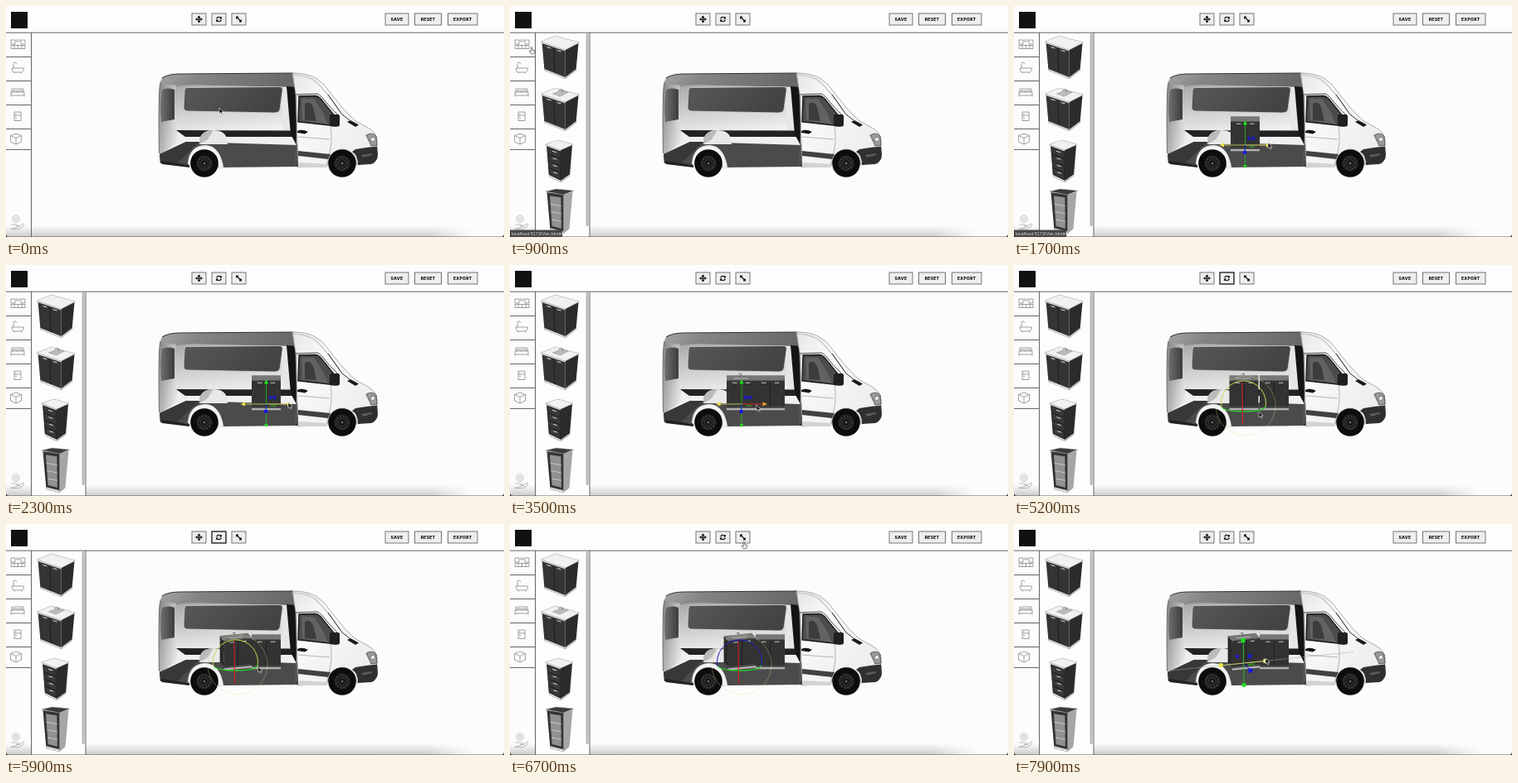
Write an HTML page that moves like this. It is 600 px wide and 279 px high and loops after 8000 ms.

```html
<!DOCTYPE html>
<html lang="en">
<head>
<meta charset="utf-8">
<title>Van planner</title>
<style>
html, body { margin: 0; width: 100%; height: 100%; overflow: hidden; background: #fcfcfc; }
svg { display: block; width: 100vw; height: 100vh; }
.btn rect { fill: #eee; stroke: #555; stroke-width: .8; }
.btn text { font: 800 5.1px Inter, "Liberation Sans", sans-serif; letter-spacing: .25px; text-anchor: middle; fill: #111; }
.icon { fill: none; stroke: #555; stroke-width: .55; stroke-linejoin: round; }
.tip { font: 5.5px "Liberation Sans", Arial, sans-serif; fill: #ddd; }
</style>
</head>
<body>
<svg viewBox="0 0 600 279" preserveAspectRatio="none">
<defs>
  <linearGradient id="roof" x2="1" y2=".1"><stop stop-color="#a6a6a6"/><stop offset=".3" stop-color="#858585"/><stop offset="1" stop-color="#686868"/></linearGradient>
  <linearGradient id="wall" x2=".2" y2="1"><stop stop-color="#969696"/><stop offset=".4" stop-color="#c4c4c4"/><stop offset=".8" stop-color="#efefef"/></linearGradient>
  <linearGradient id="rear" x2="1" y2=".5"><stop stop-color="#848484"/><stop offset=".5" stop-color="#b8b8b8"/><stop offset="1" stop-color="#efefef"/></linearGradient>
  <linearGradient id="back" x2="1"><stop stop-color="#707070"/><stop offset="1" stop-color="#3c3c3c"/></linearGradient>
  <linearGradient id="glass" x2="1" y2=".3"><stop stop-color="#585858"/><stop offset="1" stop-color="#434343"/></linearGradient>
  <linearGradient id="nose" x2="1" y2="1"><stop stop-color="#e4e4e4"/><stop offset=".3" stop-color="#fafafa"/><stop offset="1" stop-color="#e9e9e9"/></linearGradient>
  <linearGradient id="shade" x2="0" y2="1"><stop stop-color="#ccc" stop-opacity="0"/><stop offset="1" stop-color="#ccc"/></linearGradient>
  <linearGradient id="fade"><stop stop-color="#fcfcfc" stop-opacity="0"/><stop offset="1" stop-color="#fcfcfc"/></linearGradient>
  <g id="wheel">
    <circle r="16.8" fill="#0c0c0c"/><circle r="10" fill="#1c1c1c"/>
    <circle r="7.6" fill="none" stroke="#3c3c3c" stroke-width="1.8" stroke-dasharray="2.6 1.4"/>
    <circle r="4.4" fill="#141414" stroke="#555" stroke-width=".6"/><circle r="1.5" fill="#666"/>
  </g>
</defs>

<rect width="600" height="279" fill="#fcfcfc"/>
<rect y="265" width="562" height="14" fill="url(#shade)"/>
<rect x="510" y="264" width="52" height="15" fill="url(#fade)"/>

<g id="van">
  <path d="M189 86Q196 82 210 82L345 81Q352 81 352 88V170L262 172L186 180L184 178V108Q184 92 189 86Z" fill="url(#wall)"/>
  <path d="M330 97H340L344 150H334Z" fill="#e6e6e6"/>
  <path d="M189 86Q196 82 210 82L346 81L350 98L250 96Q215 94 204 98L186 97Q186 90 189 86Z" fill="url(#roof)"/>
  <path d="M188 87Q196 82 210 82L346 81" fill="none" stroke="#333" stroke-width="1"/>
  <path d="M186 93L205 96Q201 110 203 138L212 162L186 179L184 176V108Z" fill="url(#rear)"/>
  <path d="M188 101Q196 98 203 101V137L187 140Q185 116 188 101Z" fill="url(#back)"/>
  <path d="M186 92Q183 110 184.500 178" fill="none" stroke="#666" stroke-width=".8"/>
  <path d="M218 98.500L330 97.500Q334 98 333 103L330 125Q329 129 324 129L219 127Q214 127 214 122L215 102Q215 98.500 218 98.500Z" fill="url(#glass)" stroke="#ddd" stroke-width=".7"/>
  <path d="M205 150L350 150.500V158L216 158Z" fill="#232323"/>
  <path d="M216 158H350V168H216Z" fill="#f0f0f0"/>
  <path d="M185 179L217 164L351 168V194L262 195L222 192L186 190Z" fill="#4b4b4b"/>
  <path d="M185 179L217 164H233L206 190L186 190Z" fill="#383838"/>
  <path d="M186 187L221 192V195L188 191Z" fill="#222"/>
  <path d="M233 167Q233 150 250 150Q267 150 267 167Z" fill="#e8e8e8"/>
  <path d="M233 161Q236 150 250 150L243 161L233 167Z" fill="#bbb"/>
  <path d="M219 190Q221 169 240 168Q258 169 262 195L256 196Q254 176 239 175Q226 176 222 194Z" fill="#f3f3f3" stroke="#bbb" stroke-width=".4"/>
  <path d="M338 97L350 98V166L352 170V194H350L351 170L343 155Z" fill="#141414"/>
  <path d="M345 81Q364 81 374 87.500Q383 93 390 104L408 126L420 138L436 147Q446 152 447 162V185L423 192Q421 174 405 173Q390 174 387 193L352 195L349 107Z" fill="url(#nose)" stroke="#8c8c8c" stroke-width=".7"/>
  <path d="M346 83Q364 84 373 91Q386 103 402 127" fill="none" stroke="#cacaca" stroke-width="1.600"/>
  <path d="M349 107L375 106Q380 108 386 117L401 133" fill="none" stroke="#333" stroke-width=".9"/>
  <path d="M388 107L405 131L414 138" fill="none" stroke="#333" stroke-width="1"/>
  <path d="M353 109L373 108.500Q378 109 384 118L397 134L398 145L352 140Z" fill="#4c4c4c" stroke="#161616" stroke-width="1.300"/>
  <path d="M356 112H371L382 129L388 143L357 138Z" fill="#626262"/>
  <path d="M360 118Q366 114 370 122L374 139L360 138Z" fill="#3c3c3c"/>
  <rect x="390" y="131" width="12" height="14.500" rx="2" fill="#202020"/>
  <path d="M415 138L425 143.500L421 146L411 140Z" fill="#191919"/>
  <path d="M350 108V193M391 146Q394 164 389 180L386 193M352 158L390 161" fill="none" stroke="#888" stroke-width=".6"/>
  <path d="M351 151Q357 148 364 152L360 154.500L351 153Z" fill="#151515"/>
  <path d="M352 175L391 179L388 185L352 181Z" fill="#414141"/>
  <path d="M353 189L387 191V195L353 195Z" fill="#d3d3d3"/>
  <path d="M434 156Q441 152 446 157L447 168L440 169Z" fill="#9b9b9b" stroke="#444" stroke-width=".8"/>
  <circle cx="442" cy="161" r="2.600" fill="#eee" stroke="#555" stroke-width=".6"/>
  <path d="M421 173L434 171L447 169.500L448 180Q447 189 440 191L424 192Q424 180 417 176Z" fill="#303030"/>
  <path d="M428 180L441 178V180L430 183Z" fill="#5c5c5c"/>
  <use href="#wheel" x="239" y="190"/>
  <use href="#wheel" x="405" y="190"/>
</g>

<g id="panel"></g>

<rect width="600" height="32" fill="#fdfdfd"/>
<path d="M0 32.200H600M30.500 32V279M0 61.500H30M0 90.500H30M0 119.500H30M0 148.500H30M0 173.500H30" stroke="#555" stroke-width=".9" fill="none"/>
<rect x="6" y="7" width="20" height="20" fill="#111"/>

<g class="icon">
  <path d="M6 41H11V46H6ZM18 41H23V46H18ZM13 40V43H16V40M6 47.500H23V51.500H6ZM10 47.500V51.500M14.500 47.500V51.500M19 47.500V51.500"/>
  <path d="M7 75H21.500Q21.500 80 18 80H10.500Q7 80 7 75ZM9 75V70Q9 67.500 11.500 68L13 70M10 80V81.500M18.500 80V81.500"/>
  <path d="M7 104V100H21V104M6 108V104H22V108ZM8.500 104V102.200H13V104M15 104V102.200H19.500V104M6 108V109.500M22 108V109.500"/>
  <path d="M10 128H18V138.500H10ZM10 132H18M12 129.500V131M12 133.500V136"/>
  <path d="M12 154L18.500 156.500V164L12 167L5.500 164V156.500ZM5.500 156.500L12 159.500L18.500 156.500M12 159.500V167"/>
  <g stroke="#888"><circle cx="12" cy="257" r="4.200"/><circle cx="12" cy="257" r="1.700"/><path d="M6 264H10Q14 263 16 266H12M16 266L21 263Q23 264 20 267L15 269.500H6Z"/></g>
</g>

<g class="btn" id="buttons"></g>
<g id="scene"></g>
<path d="M0 275Q0 279 4 279H0ZM600 275Q600 279 596 279H600Z" fill="#111"/>
<path d="M0 278.700H600" stroke="#555" stroke-width=".6"/>
</svg>

<script>
const $ = id => document.getElementById(id);
const LOOP = 8000, STEP = 100, TURN = 17 * Math.PI / 180;

const poly = (pts, fill, extra = '') =>
  `<polygon points="${pts.map(p => p.map(v => v.toFixed(2)).join()).join(' ')}" fill="${fill}" ${extra}/>`;
const line = (x1, y1, x2, y2, color, w = 1) =>
  `<path d="M${x1} ${y1}L${x2} ${y2}" stroke="${color}" stroke-width="${w}" fill="none"/>`;
const box = (x, y, s, color, o = 1) =>
  `<rect x="${x - s / 2}" y="${y - s / 2}" width="${s}" height="${s}" fill="${color}" opacity="${o}"/>`;
const mix = (a, b, k) => a + (b - a) * k;

// Eased value from rows of [time, ...values]
function track(rows, t) {
  const i = rows.findIndex(r => r[0] > t);
  if (i < 0) return rows[rows.length - 1].slice(1);
  if (i === 0) return rows[0].slice(1);
  const a = rows[i - 1], b = rows[i];
  const k = (t - a[0]) / (b[0] - a[0]), e = k * k * (3 - 2 * k);
  return a.slice(1).map((v, j) => mix(v, b[j + 1], e));
}

function drawButtons() {
  const marks = [
    'M-3.400 0H3.400M0 -3.400V3.400M-2 -1.300L-3.500 0L-2 1.300M2 -1.300L3.500 0L2 1.300M-1.300 -2L0 -3.500L1.300 -2M-1.300 2L0 3.500L1.300 2',
    'M-2.800 -.500A2.900 2.900 0 0 1 2.400 -1.500M2.800 .500A2.900 2.900 0 0 1 -2.400 1.500M2.800 -3V-1H.800M-2.800 3V1H-.800',
    'M-2.500 -2.500L2.500 2.500M-2.800 -.500V-2.800H-.500M.500 2.800H2.800V.500'
  ];
  const frame = (x, w) => `<rect x="${x}" y="9" width="${w}" height="14"/>`;
  $('buttons').innerHTML =
    marks.map((d, i) => frame(224 + i * 24, 17) +
      `<path transform="translate(${232.5 + i * 24} 16)" d="${d}" fill="none" stroke="#111" stroke-width="1.2"/>`).join('') +
    [['SAVE', 457, 28], ['RESET', 492.5, 32], ['EXPORT', 532.5, 35.5]]
      .map(([s, x, w]) => frame(x, w) + `<text x="${x + w / 2}" y="17.9">${s}</text>`).join('');
}

// Three-quarter view of a cupboard, narrowing to the floor:
// front edge from (x,y), side going back to the right
function thumb(x, y, fw, fd, sw, sd, h, kind) {
  const tall = kind === 'tall', taper = tall ? 4 : 3;
  const at = (u, v) => [x + fw * u + taper * v * (1 - u), y + fd * u + (h - 1 + u) * v];
  const r = at(1, 0), b = [r[0] + sw, r[1] - sd], l = [x + sw, y - sd];
  const foot = [b[0] - taper, b[1] + h - 2], low = at(1, 1);
  const face = (u0, v0, u1, v1, f, e) => poly([at(u0, v0), at(u1, v0), at(u1, v1), at(u0, v1)], f, e);
  let s = poly([r, b, foot, low], tall ? '#a6a6a6' : '#2b2b2c') +
    face(0, 0, 1, 1, '#333436') + face(0, .94, 1, 1, '#ddd');
  if (!tall) s += line(low[0], low[1] - .8, foot[0], foot[1] - .8, '#ccc', 1.6);
  const handle = (u, v) => { const [a, c] = at(u, v); return line(a, c, a + 5, c + 1.4, '#ddd', 1); };
  if (kind === 'drawers') {
    for (let i = 0; i < 4; i++) {
      const v = .06 + i * .22;
      s += face(.05, v, .96, v + .205, '#38393b', 'stroke="#1d1d1d" stroke-width=".6"') + handle(.4, v + .07);
    }
  } else if (tall) {
    s += face(.16, .08, .84, .88, '#909192');
    for (const v of [.3, .5, .7]) s += line(...at(.16, v), ...at(.84, v), '#c8c8c8', 1);
  } else {
    s += line(...at(.5, 0), ...at(.5, .94), '#151515', .8) + handle(.2, .11) + handle(.64, .11);
  }
  s += poly([[x - 1.5, y - 1], l, [b[0] + 1, b[1] - 1], r], tall ? '#3a3a3a' : '#f1f1f1',
    'stroke="#999" stroke-width=".5"') + (tall ? '' : line(x - 1, y, r[0], r[1] + .7, '#ccc', 1.6));
  if (kind === 'sink') {
    const m = x + (fw + sw) / 2, n = y - 1;
    s += poly([[m - 9, n], [m + 1, n - 4], [m + 10, n - 2], [m, n + 3]], '#bbb', 'stroke="#888" stroke-width=".5"') +
      `<path d="M${m + 3} ${n - 2}V${n - 5}Q${m} ${n - 6} ${m - 2} ${n - 4}" fill="none" stroke="#777" stroke-width=".8"/>`;
  }
  return s;
}

function drawPanel() {
  $('panel').innerHTML = '<rect x="30" y="32" width="66" height="247" fill="#fdfdfd"/>' +
    '<rect x="91.5" y="33" width="3.3" height="233" rx="1.6" fill="#bbb"/>' +
    line(96, 32, 96, 279, '#555', .9) +
    thumb(38.5, 44, 28, 9, 16, 8, 35, 'doors') +
    thumb(38.5, 107, 28, 9, 16, 8, 35, 'sink') +
    thumb(44, 168, 17, 6, 14, 6, 39, 'drawers') +
    thumb(44.5, 225, 20, 3, 11, 4, 47, 'tall');
}

// Cupboard inside the van, turned by a around its upright axis
function cupboard(cx, a, sink) {
  const c = Math.cos(a), n = Math.sin(a);
  const at = (u, v, y) => [cx + u * 17.5 * c + v * 9 * n, y + (v * 9 * c - u * 17.5 * n) * .33];
  const quad = (p, q, y0, y1, f) => poly([at(...p, y0), at(...q, y0), at(...q, y1), at(...p, y1)], f);
  const L = [-1, 1], R = [1, 1], B = [-1, -1];
  let s = quad(B, L, 136.5, 168, '#292929') + quad(L, R, 136.5, 168, '#333') +
    quad(L, R, 170, 172.3, '#b5b5b5') +
    poly([B, [1, -1], R, L].map(p => at(...p, 136.3)), '#777') +
    line(...at(...L, 136.5), ...at(...R, 136.5), '#555', .9) +
    line(...at(0, 1, 138), ...at(0, 1, 168), '#151515', .7);
  for (const u of [-.6, .3]) s += line(...at(u, 1, 139.3), ...at(u + .32, 1, 139.3), '#ddd', .9);
  if (sink) {
    const [x, y] = at(0, -.5, 136);
    s += poly([[-.6, -.3], [.5, -.3], [.5, .7], [-.6, .7]].map(p => at(...p, 136.3)), '#999', 'stroke="#555" stroke-width=".4"') +
      `<path d="M${x} ${y}V${y - 3}Q${x - 2} ${y - 4} ${x - 3} ${y - 2}" fill="none" stroke="#444" stroke-width=".8"/>`;
  }
  return s;
}

const planes = (x, y) => box(x + 5, y - 8, 4, '#1717d8', .8) + box(x + 10, y - 8, 4, '#1717d8', .8) +
  line(x + 5, y + 2, x + 12, y + 2, '#2a8a20', 1.6);

function mover(x, active) {
  const y = 168, tip = active ? '#f4ee44' : '#f0a030';
  return line(x, 141, x, 194, '#25c425', .8) +
    line(x - 26, y, x, y, '#e8e46a', .8) + line(x, y, x + 28, y, active ? '#e8e46a' : '#e03028', 1) +
    planes(x, y) + line(x, y, x - .5, 177, '#1717d8', 1) +
    poly([[x, 138], [x - 2.6, 143.5], [x + 2.6, 143.5]], '#20e020') +
    poly([[x, 196], [x - 2.4, 192], [x + 2.4, 192]], '#20e020') +
    poly([[x - 31, y], [x - 25.5, y - 2.4], [x - 25.5, y + 2.4]], '#e9e544') +
    poly([[x + 31, y], [x + 25.5, y - 2.4], [x + 25.5, y + 2.4]], tip) +
    `<circle cx="${x - .5}" cy="177" r="2.3" fill="#1717e8"/>`;
}

function rotator(active) {
  const arc = (d, color, w) => `<path d="${d}" fill="none" stroke="${color}" stroke-width="${w}"/>`;
  return '<circle cx="279" cy="170" r="36" fill="none" stroke="#e2dd96" stroke-width=".5" opacity=".7"/>' +
    arc('M250 172A27 27 0 1 1 303 172', active ? '#c9d84a' : '#2020c8', 1) +
    arc('M250.500 172Q254 177 277 177Q300 177 303 171', '#22d522', 1.3) +
    line(275, 142, 275.5, 193, '#e02020', 1);
}

function scaler(a, drag) {
  const x = 277, y = 168, dx = 27 * Math.cos(a), dy = 9 * Math.sin(a), dz = 27 * Math.sin(a);
  const k = dy / dx;
  return (drag ? line(185, y + 92 * k, 409, y - 132 * k, '#a5a58c', .5) : '') +
    line(276.3, 141, x, 194, '#25c425', .9) +
    line(x - dx, y + dy, x, y, '#dedb6a', .8) + line(x, y, x + dx, y - dy, drag ? '#dedb6a' : '#e03028', .9) +
    line(x, y, x + dz, 177, '#1717d8', .9) +
    box(269, 160, 4, '#1717d8', .85) + box(284, 159.5, 5, '#1717d8', .85) +
    line(282, 170, 290, 169, '#2a8a20', 2) +
    box(276, 140.5, 5, '#20e020') + box(277, 194.5, 4.6, '#20e020') +
    box(x - dx - 2, y + dy, 4.8, '#f0ec50') +
    box(x + dx, y - dy, 4.8, drag ? '#f5f090' : '#e03028') + box(x + dz, 177, 5, '#1717e8');
}

function pointer(x, y, hand) {
  const d = hand
    ? 'M-.800 0Q0 -.800 .800 0V3L3.500 3.600V6L2.500 7.500H-1L-3 4.500L-2.200 4L-.800 5Z'
    : 'M0 0V7L1.700 5.500L2.900 8L4.100 7.400L2.900 5H5.100Z';
  return `<path transform="translate(${x.toFixed(2)} ${y.toFixed(2)})" d="${d}" fill="${hand ? '#fff' : '#111'}" stroke="${hand ? '#222' : '#eee'}" stroke-width=".6"/>`;
}

const path = [
  [0, 257, 123], [500, 15, 45], [800, 15, 46], [1100, 58, 62], [1250, 58, 62],
  [1600, 306, 165], [1700, 306, 165], [2300, 340, 166], [2450, 340, 166],
  [2900, 62, 134], [3100, 62, 134], [3400, 297, 169], [3500, 297, 169],
  [3800, 295.5, 169], [3900, 295.5, 168], [4200, 276, 57], [4400, 257, 18],
  [4600, 257, 18], [5000, 295, 177], [5200, 295, 177], [6000, 304, 172],
  [6200, 304, 172], [6600, 282, 22], [6900, 282, 22], [7400, 303, 162], [7900, 303, 162]
];

function render(t) {
  const [px, py] = track(path, t);
  const [first] = track([[1700, 278.5], [2300, 313.5]], t);
  const [second] = track([[3500, 278.5], [3800, 277]], t);
  const [turn] = track([[5200, 0], [6000, TURN]], t);
  const between = (a, b) => t >= a && t < b;
  $('panel').style.display = t >= 700 ? '' : 'none';

  let s = '';
  if (t >= 1300) s += cupboard(first, 0, false);
  if (t >= 3100) s += cupboard(second, turn, true);
  if (between(1300, 3100)) s += mover(first, between(1600, 2450));
  else if (between(3100, 4500)) s += mover(second + .5, false);
  else if (between(4500, 6900)) s += rotator(between(5000, 6200));
  else if (t >= 6900) s += scaler(turn, t >= 7400);
  if (between(4500, 6200))
    s += '<rect x="248" y="9" width="17" height="14" fill="none" stroke="#111" stroke-width="1"/>';
  if (between(700, 1800) || between(2800, 3400))
    s += '<rect y="270.500" width="63" height="8.500" fill="#444"/><text class="tip" x="1.500" y="276.700">localhost:5173/Van.html#</text>';
  const hand = py < 24 || (px < 96 && t < 3200);
  $('scene').innerHTML = s + pointer(px, py, hand);
}

drawButtons();
drawPanel();
const start = performance.now();
let last = -1;
function tick() {
  const t = Math.floor((performance.now() - start) % LOOP / STEP) * STEP;
  if (t !== last) render(last = t);
  requestAnimationFrame(tick);
}
tick();
</script>
</body>
</html>
```
